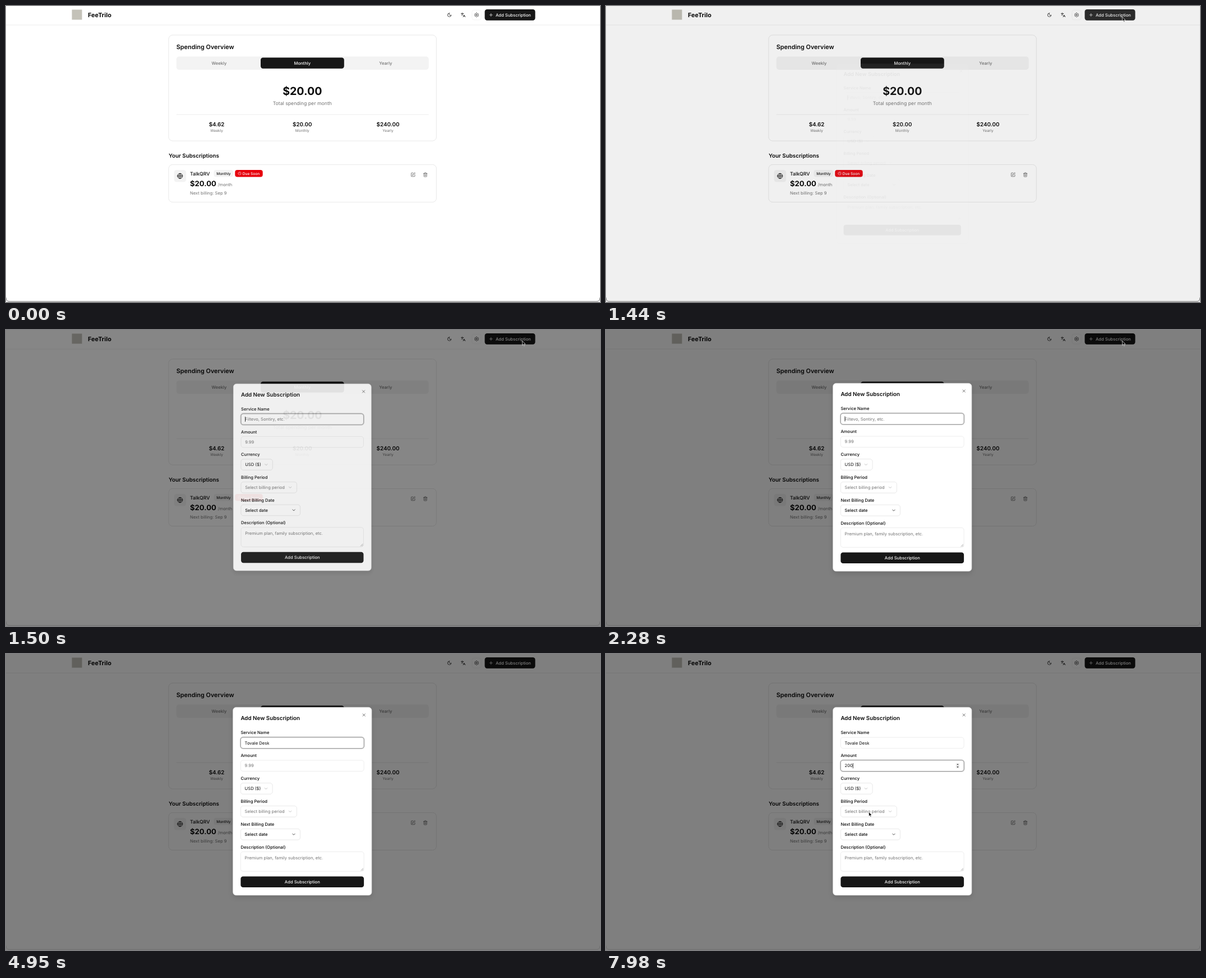
An HTML page that plays this animation: 1059x529 px, repeating every 8 s.

```html
<!DOCTYPE html>
<html lang="en">
<head>
<meta charset="utf-8">
<title>Subscription form</title>
<style>
html, body { margin: 0; width: 100%; height: 100%; overflow: hidden; background: #fff; }
svg { display: block; width: 100vw; height: 100vh; }
text { font-family: Inter, "Liberation Sans", sans-serif; text-rendering: geometricPrecision; white-space: pre; }
.shadow { filter: drop-shadow(0 .6px .7px rgba(0, 0, 0, .1)); }
.lift { filter: drop-shadow(0 4px 4px rgba(0, 0, 0, .12)); }
</style>
</head>
<body>
<svg id="stage" viewBox="0 0 1059 529">
  <g id="page"></g>
  <rect id="shade" width="1059" height="529" opacity="0"/>
  <g id="dialog" class="lift"></g>
  <path d="M0 521Q0 528 6 528H1053Q1059 528 1059 521" fill="none" stroke="#6e6e6e"/>
  <path id="pointer" d="M0 0V7.6L1.7 6 2.9 8.8 4.2 8.3 3 5.6H5.4Z" stroke="#fff" stroke-width=".7" stroke-linejoin="round"/>
</svg>
<script>
const INK = '#0a0a0a', BLACK = '#171717', GREY = '#737373', LINE = '#e5e5e5', PALE = '#f3f3f3';
const LOOP = 8000, STEP = 30;
const $ = id => document.getElementById(id);
let layer;

function add(tag, attrs, parent = layer) {
  const el = document.createElementNS('http://www.w3.org/2000/svg', tag);
  for (const key in attrs) el.setAttribute(key, attrs[key]);
  parent.append(el);
  return el;
}

// y is the middle of the capitals
function text(str, x, y, size, weight = 400, fill = INK, anchor = 'start') {
  const el = add('text', { x, y: y + size * .36, 'font-size': size, 'font-weight': weight, fill, 'text-anchor': anchor });
  el.textContent = str;
  return el;
}

const box = (x, y, width, height, rx, fill, stroke = 'none', more = {}) =>
  add('rect', { x, y, width, height, rx, fill, stroke, 'stroke-width': .7, ...more });

// 24-unit icon centred on x, y
function icon(d, x, y, size, stroke = INK, width = 2) {
  const s = size / 24;
  return add('path', { d, fill: 'none', stroke, 'stroke-width': width, 'stroke-linecap': 'round', 'stroke-linejoin': 'round',
    transform: `translate(${x - size / 2} ${y - size / 2}) scale(${s})` });
}

const ring24 = r => `M${12 - r} 12a${r} ${r} 0 1 0 ${2 * r} 0a${r} ${r} 0 1 0 ${-2 * r} 0`;

function gear() {
  const pts = [];
  for (let i = 0; i < 72; i++) {
    const a = i * Math.PI / 36, r = 8.9 + 1.2 * Math.cos(6 * a);
    pts.push((12 + r * Math.sin(a)).toFixed(2) + ' ' + (12 - r * Math.cos(a)).toFixed(2));
  }
  return 'M' + pts.join('L') + 'Z' + ring24(3);
}

const ICONS = {
  moon: 'M12 3a6 6 0 0 0 9 9 9 9 0 1 1-9-9Z',
  lang: 'M5 8l6 6M4 14l6-6 2-3M2 5h12M7 2h1M22 22l-5-10-5 10M14 18h6',
  plus: 'M5 12h14M12 5v14',
  cross: 'M6 6l12 12M18 6L6 18',
  down: 'M6 9l6 6 6-6',
  clock: ring24(10) + 'M12 6v6l4 2',
  globe: ring24(10) + 'M2 12h20M12 2a14.5 14.5 0 0 0 0 20a14.5 14.5 0 0 0 0-20',
  edit: 'M12 3H5a2 2 0 0 0-2 2v14a2 2 0 0 0 2 2h14a2 2 0 0 0 2-2v-7M18.4 2.6a2.1 2.1 0 0 1 3 3l-9 9-3.9.9.9-3.9Z',
  bin: 'M3 6h18M19 6v14a2 2 0 0 1-2 2H7a2 2 0 0 1-2-2V6M8 6V4a2 2 0 0 1 2-2h4a2 2 0 0 1 2 2v2M10 11v6M14 11v6'
};

// ---- page ----
layer = $('page');
box(0, 0, 1059, 529, 0, '#fff');
add('path', { d: 'M0 34H1059', stroke: LINE, 'stroke-width': .7 });
box(117.5, 6.5, 18, 18, 0, '#c4c2b9');
text('FeeTrilo', 146, 15.8, 10.9, 700);
box(830.7, 7.2, 16.6, 17.6, 4, '#fff', '#efefef');
icon(ICONS.moon, 790.5, 16, 8.7);
icon(ICONS.lang, 815, 16, 8.7);
icon(gear(), 839, 16, 8.7);
const addButton = box(853.5, 6, 90, 19.7, 4.2, BLACK);
icon(ICONS.plus, 864.7, 16, 8.7, '#fafafa');
text('Add Subscription', 873, 15.9, 7.63, 500, '#fafafa');

box(290, 52, 477.3, 189, 7, '#fff', LINE, { class: 'shadow' });
text('Spending Overview', 303.7, 73.2, 10.9, 600);
box(303.7, 90.3, 450, 23.6, 5, PALE);
box(454, 92.2, 148.8, 19.6, 4.2, BLACK);
text('Weekly', 380, 102, 7.63, 500, GREY, 'middle');
text('Monthly', 528.3, 102, 7.63, 500, '#fafafa', 'middle');
text('Yearly', 676.8, 102, 7.63, 500, GREY, 'middle');
text('$20.00', 528.3, 152, 19.6, 700, INK, 'middle');
text('Total spending per month', 528.3, 173.8, 8.72, 400, GREY, 'middle');
add('path', { d: 'M303.7 194H753.7', stroke: LINE, 'stroke-width': .7 });
[['$4.62', 'Weekly', 375.6], ['$20.00', 'Monthly', 528.3], ['$240.00', 'Yearly', 681]].forEach(([sum, label, x]) => {
  text(sum, x, 211, 9.81, 600, INK, 'middle');
  text(label, x, 223, 6.54, 400, GREY, 'middle');
});

text('Your Subscriptions', 290, 267, 9.81, 600);
box(290, 283.5, 477.3, 67, 7, '#fff', LINE, { class: 'shadow' });
box(299.6, 293, 21.6, 21.6, 4.5, PALE);
icon(ICONS.globe, 310.2, 303.8, 10.9);
text('TalkQRV', 328, 299.5, 8.72, 500);
box(370.5, 293, 34.5, 12.4, 4, PALE);
text('Monthly', 387.9, 299.2, 6.54, 500, BLACK, 'middle');
box(408.3, 293, 49.4, 12.4, 4, '#e7000b');
icon(ICONS.clock, 416.6, 299.2, 6.5, '#fff');
text('Due Soon', 421.8, 299.2, 6.54, 500, '#fff');
text('$20.00', 328, 317, 13.08, 700);
text('/month', 377.8, 319, 7.63, 400, GREY);
text('Next billing: Sep 9', 328, 333.8, 7.63, 400, GREY);
icon(ICONS.edit, 725.7, 301.5, 8.7, '#555');
icon(ICONS.bin, 747.6, 301.5, 8.7, '#555');

// ---- dialog ----
layer = $('dialog');
const LEFT = 418.4, INNER = 425.6, WIDE = 219.7;
box(404.7, 95.3, 247.2, 335.8, 5.5, '#fff', LINE);
text('Add New Subscription', LEFT, 114.2, 9.81, 600);
icon(ICONS.cross, 638.2, 109, 8.7, '#444');
['Service Name', 'Amount', 'Currency', 'Billing Period', 'Next Billing Date', 'Description (Optional)']
  .forEach((label, i) => text(label, LEFT, 140.7 + i * 40.85, 7.63, 500));

function field(y, hint) {
  box(LEFT, y, WIDE, 19.6, 4.2, '#fff', LINE);
  const ring = add('g', { opacity: 0 });
  add('rect', { x: LEFT - .5, y: y - .5, width: WIDE + 1, height: 20.6, rx: 4.8, fill: 'none', stroke: '#a1a1a1', 'stroke-opacity': .55, 'stroke-width': 1.9 }, ring);
  add('rect', { x: LEFT, y, width: WIDE, height: 19.6, rx: 4.2, fill: 'none', stroke: '#999', 'stroke-width': .7 }, ring);
  const mid = y + 9.8;
  return {
    ring,
    hint: text(hint, INNER, mid, 7.63, 400, GREY),
    value: text('', INNER, mid, 7.63),
    caret: add('rect', { y: mid - 4.6, width: .8, height: 9.2, fill: INK })
  };
}

const service = field(149, 'Filtevo, Sontiry, etc.');
const amount = field(189.9, '9.99');
const spinner = add('g', { fill: '#444' });
box(623.6, 194.8, 6.8, 9.8, 1, '#efefef', 'none', {});
spinner.append(layer.lastChild);
add('path', { d: 'M627 196l1.7 2.3h-3.4ZM627 203.4l1.7-2.3h-3.4Z' }, spinner);

function select(y, width, label, fill, weight, chevronX, chevron) {
  box(LEFT, y, width, 19.6, 4.2, '#fff', LINE, { class: 'shadow' });
  text(label, INNER, y + 9.8, 7.63, weight, fill);
  icon(ICONS.down, chevronX, y + 9.8, 8.7, chevron);
}
select(230.7, 56.6, 'USD ($)', INK, 400, 463.5, '#aaa');
select(271.6, 100, 'Select billing period', GREY, 400, 506.5, '#aaa');
select(312.5, 106, 'Select date', INK, 500, 513, INK);

box(LEFT, 353.4, WIDE, 35, 4.2, '#fff', LINE);
text('Premium plan, family subscription, etc.', INNER, 364, 7.63, 400, GREY);
add('path', { d: 'M632.6 387.2l4.4-4.4M635 387.2l2-2', stroke: '#777', 'stroke-width': .6 });
box(LEFT, 397.5, WIDE, 19.6, 4.2, BLACK);
text('Add Subscription', 528.3, 407.3, 7.63, 500, '#fafafa', 'middle');

// ---- motion ----
const NAME = 'Tovale Desk', SUM = '200';
const NAME_KEYS = [2460, 2700, 3060, 3240, 3390, 3570, 3750, 3900, 4080, 4200, 4380];
const SUM_KEYS = [6480, 6840, 6990];
const BLINK = [1770, 2280, 4830, 5280, 5730, 6030, 7440, 7890];
const FOCUS = 6030;
const SHADE = [[1410, 0], [1440, .06], [1470, .38], [1500, .475], [1530, .495], [1560, .5]];
const OPEN = [[1410, 0], [1440, .05], [1470, .56], [1500, .88], [1530, .97], [1560, 1]];
const MOVES = [
  { from: 690, to: 1260, end: 2460, a: [1018, 110], b: [920.6, 19.6] },
  { from: 7440, to: 7980, end: LOOP, a: [678, 161], b: [468.7, 282.4] }
];

const clamp = v => Math.min(1, Math.max(0, v));
const passed = (times, t) => times.filter(k => k <= t).length;

function track(steps, t) {
  if (t <= steps[0][0]) return steps[0][1];
  for (let i = 1; i < steps.length; i++) {
    const [t0, v0] = steps[i - 1], [t1, v1] = steps[i];
    if (t <= t1) return v0 + (v1 - v0) * (t - t0) / (t1 - t0);
  }
  return steps[steps.length - 1][1];
}

function drawField(f, str, ring, caretOn) {
  f.value.textContent = str;
  f.hint.style.display = str ? 'none' : '';
  f.ring.setAttribute('opacity', ring);
  f.caret.setAttribute('x', INNER + (str ? f.value.getComputedTextLength() : 0));
  f.caret.style.display = caretOn ? '' : 'none';
}

function draw(t) {
  $('shade').setAttribute('opacity', track(SHADE, t));
  const open = track(OPEN, t), zoom = .95 + .05 * open;
  $('dialog').setAttribute('opacity', open);
  $('dialog').setAttribute('transform', `translate(528.3 263.2) scale(${zoom}) translate(-528.3 -263.2)`);
  addButton.setAttribute('fill', t >= 1170 && t < 1470 ? '#2e2e2e' : BLACK);

  const lit = passed(BLINK, t) % 2 === 0, shift = clamp((t - FOCUS) / 150), second = t >= FOCUS;
  drawField(service, NAME.slice(0, passed(NAME_KEYS, t)), clamp((t - 1440) / 60) * (1 - shift), lit && !second);
  drawField(amount, SUM.slice(0, passed(SUM_KEYS, t)), shift, lit && second);
  spinner.style.display = second ? '' : 'none';

  const move = MOVES.find(m => t >= m.from && t < m.end);
  $('pointer').style.display = move ? '' : 'none';
  if (move) {
    const p = 1 - (1 - clamp((t - move.from) / (move.to - move.from))) ** 3;
    const [x, y] = move.a.map((v, i) => v + (move.b[i] - v) * p);
    $('pointer').setAttribute('transform', `translate(${x} ${y})`);
  }
}

const start = performance.now();
function tick() {
  const t = (performance.now() - start) % LOOP;
  draw(Math.floor(t / STEP) * STEP);
  requestAnimationFrame(tick);
}
tick();
</script>
</body>
</html>
```
